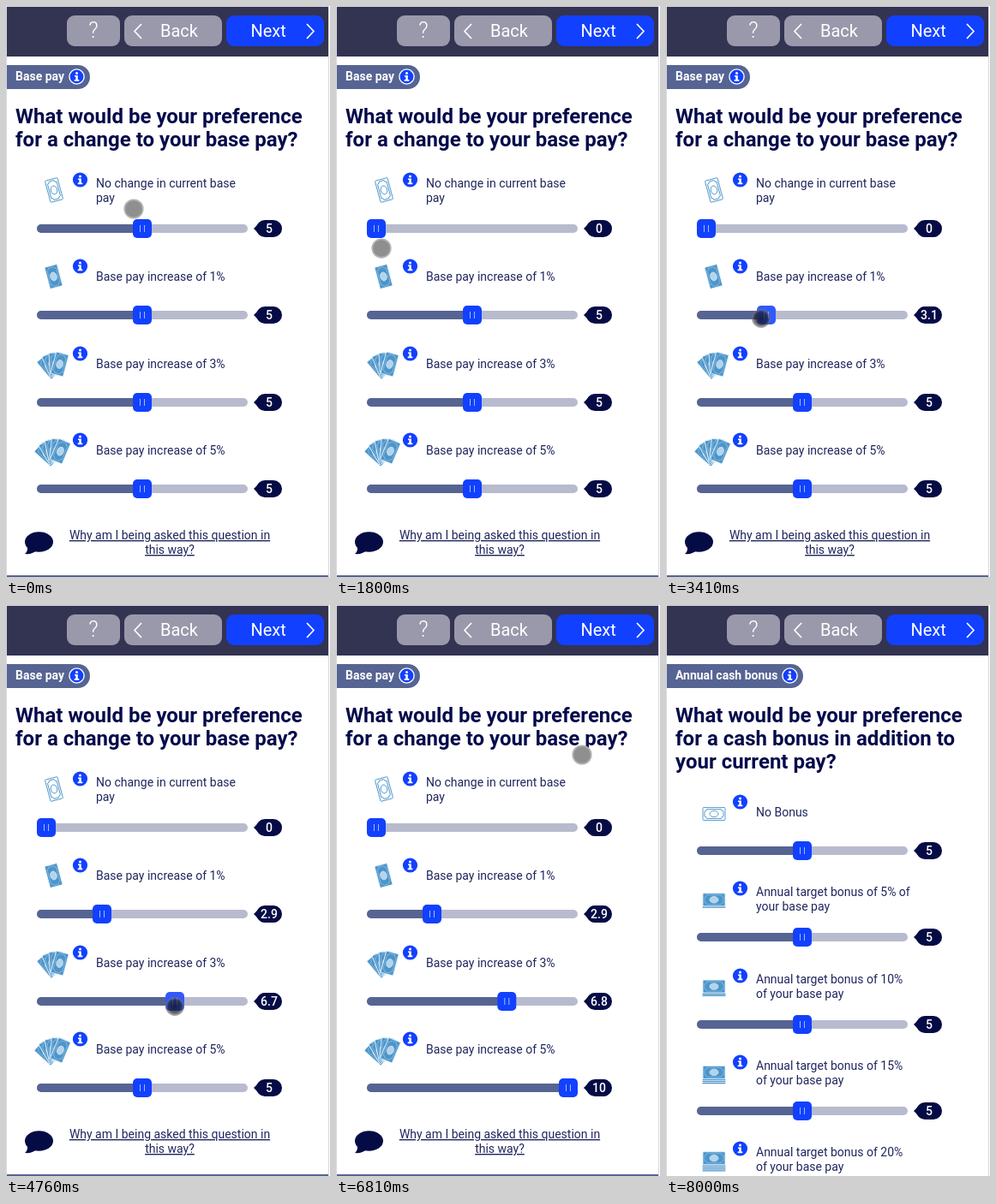
Write an HTML page that moves like this. It is 378 px wide and 667 px high and loops after 8680 ms.

```html
<!DOCTYPE html>
<html lang="en">
<head>
<meta charset="utf-8">
<title>Pay preferences</title>
<style>
  html, body { margin: 0; width: 100%; height: 100%; overflow: hidden; background: #fff; }
  svg { display: block; width: 378px; height: 667px; font-family: Roboto, "Open Sans", sans-serif; }
  .title { font-size: 24px; font-weight: 700; fill: #050b4b; }
  .label, .link { font-size: 14px; fill: #20265e; }
  .link { text-decoration: underline; text-anchor: middle; }
  .tag { font-size: 14px; font-weight: 700; fill: #fff; }
  .value { font-size: 14px; font-weight: 500; fill: #fff; text-anchor: middle; }
  .button { font-size: 20px; fill: #fff; }
  .chevron { fill: none; stroke: #fff; stroke-width: 1.7; }
</style>
</head>
<body>
<svg id="stage" viewBox="0 0 378 667"></svg>
<script>
const BLUE = '#1240ff', NAVY = '#050b45', SLATE = '#566493', NOTE = '#4c95ca';
const LOOP = 8680, MIN_X = 47, UNIT = 22.4;

// Bursts of movement: start, end, steps
const bursts = [
  [60, 360, 4], [630, 1440, 14], [1500, 1500, 1], [1690, 2390, 12],
  [3010, 3410, 8], [3590, 3650, 2], [3830, 4640, 15], [4700, 4760, 2],
  [5000, 5040, 2], [5280, 6090, 15], [6150, 6390, 5], [6630, 7270, 11],
  [7700, 8000, 6]
];

// Pointer path: time, x, y
const path = [
  [0, 149, 237], [360, 158, 263], [570, 158, 263], [1000, 90, 263],
  [1440, 28, 264], [1500, 18, 264], [1627, 18, 264], [1817, 53, 283],
  [2390, 153, 358], [2950, 153, 360], [3410, 111, 365], [3530, 111, 365],
  [3650, 106, 365], [3770, 106, 365], [4160, 148, 485], [4340, 159, 474],
  [4460, 159, 471], [4640, 187, 470], [4760, 197, 469], [4960, 197, 469],
  [5040, 199.3, 469], [5220, 199.3, 469], [5680, 156, 588], [5900, 163, 572],
  [6032, 183, 569], [6090, 214, 569], [6390, 307, 571], [6570, 307, 571],
  [6822, 287, 175], [7270, 309, 33], [LOOP, 309, 33]
];

// One drag per slider: start, release, handle offset from the pointer
const drags = [[600, 1690, 1], [2960, 3830, 6], [4400, 5280, 0], [5900, 6630, -4]];

const clamp = (v, lo, hi) => Math.min(hi, Math.max(lo, v));
const text = (cls, x, y, s) => `<text class="${cls}" x="${x}" y="${y}">${s}</text>`;
const lines = (cls, x, y, gap, list) =>
  list.map((s, i) => text(cls, x, y + i * gap, s)).join('');
const box = (x, y, w, h, r, fill, more = '') =>
  `<rect x="${x}" y="${y}" width="${w}" height="${h}" rx="${r}" fill="${fill}" ${more}/>`;

function info(x, y, ring) {
  return `<g transform="translate(${x} ${y})">
    <circle r="8.6" fill="${BLUE}" ${ring ? 'stroke="#fff" stroke-width="1.4"' : ''}/>
    <circle cy="-4" r="1.5" fill="#fff"/>
    <path d="M-2.5-1.6H1.3V3.6H2.8V5.2H-2.8V3.6H-1.2V0H-2.5Z" fill="#fff"/></g>`;
}

function note(filled, transform) {
  const face = filled ? NOTE : '#fff', line = filled ? '#c4def1' : NOTE;
  return `<g transform="${transform}" stroke="${line}" stroke-width=".9">
    ${box(-7.5, -13, 15, 26, 1, face, filled ? 'stroke="#e4f0f9"' : '')}
    <path d="M-3-11H3A2.5 2.5 0 0 0 5.5-8.5V8.5A2.5 2.5 0 0 0 3 11H-3A2.5 2.5 0 0 0-5.5 8.5V-8.5A2.5 2.5 0 0 0-3-11Z"
      fill="none" stroke-opacity="${filled ? .45 : 1}"/>
    <ellipse rx="3.7" ry="5" fill="${filled ? '#b3d4ec' : '#fff'}"/></g>`;
}

const fan = (x, y, angles) =>
  angles.map(a => note(true, `translate(${x} ${y}) rotate(${a}) translate(0 -14)`)).join('');

function stack(y, n) {
  let out = '';
  for (let i = n; i > 0; i--) out += box(42.5, y + 6 + i * 2, 27, 1.4, .6, NOTE);
  return out + note(true, `translate(56 ${y}) rotate(90)`);
}

function slider(y, id) {
  return `${box(36, y - 5, 246, 10, 5, '#b8bbce')}
    ${box(36, y - 5, 123, 10, 5, SLATE, `id="fill${id}"`)}
    <g id="knob${id}" transform="translate(159 ${y})">
      ${box(-11, -11, 22, 22, 5, BLUE)}
      <path d="M-2.5-4V4M2.5-4V4" stroke="#9fc0ee"/></g>
    <path d="M289 ${y}L295 ${y - 6}V${y + 6}Z" fill="${NAVY}"/>
    ${box(292, y - 10, 30, 20, 10, NAVY)}
    <text class="value" id="value${id}" x="307" y="${y + 4.5}">5</text>`;
}

const tag = (w, s) =>
  `<path d="M1 69H${w - 13}a14 14 0 0 1 0 28H1Z" fill="${SLATE}"/>` +
  text('tag', 11, 87, s) + info(w - 14.5, 82.5, true);

const rowY = [260, 361, 463, 564];
const names = [['No change in current base', 'pay'],
  ...[1, 3, 5].map(n => [`Base pay increase of ${n}%`])];
const bonus = [['No Bonus'], ['Annual target bonus of 5% of', 'your base pay'],
  ...[10, 15, 20].map(n => [`Annual target bonus of ${n}%`, 'of your base pay'])];

const firstPage = tag(97, 'Base pay') +
  lines('title', 11, 137, 27, ['What would be your preference', 'for a change to your base pay?']) +
  rowY.map((y, i) => info(86.5, y - 57) +
    lines('label', 105, y - (i ? 40 : 48), 17, names[i]) + slider(y, i)).join('') +
  note(false, 'translate(56 215) rotate(-15)') +
  note(true, 'translate(55.5 316) rotate(-15)') +
  fan(59, 432, [-40, -22, -3, 15]) +
  fan(58, 533, [-48, -30, -12, 6, 23]) +
  `<ellipse cx="38.5" cy="626" rx="16.5" ry="11.8" fill="${NAVY}"/>
   <path d="M24 629Q27 636 22 640Q30 641 36 636Z" fill="${NAVY}"/>` +
  lines('link', 191, 623, 17, ['Why am I being asked this question in', 'this way?']) +
  box(1, 665, 375, 2, 0, SLATE);

const secondPage = tag(159, 'Annual cash bonus') +
  lines('title', 11, 137, 27,
    ['What would be your preference', 'for a cash bonus in addition to', 'your current pay?']) +
  bonus.map((s, i) => {
    const y = (rowY[i] || 665) + 27;
    return info(86.5, y - 57) + lines('label', 105, y - (i ? 48 : 40), 17, s) +
      (i < 4 ? slider(y, 'b' + i) : '') +
      (i ? stack(y - 43 - i * .7, i) : note(false, 'translate(56 244) rotate(90)'));
  }).join('');

const header = box(1, 1, 375, 58, 0, '#333352') +
  box(71, 11, 62, 36, 9, '#9a98ab') + box(138, 11, 114, 36, 9, '#9a98ab') +
  box(257, 11, 114, 36, 9, BLUE, 'id="next"') +
  '<text class="button" x="102" y="37" text-anchor="middle" style="font-size:25px;font-weight:300">?</text>' +
  text('button', 180, 36, 'Back') + text('button', 285.5, 36, 'Next') +
  '<path class="chevron" d="M158 21L150 29.500L158 38M351 21L359 29.500L351 38"/>';

document.getElementById('stage').innerHTML = `
  <defs><radialGradient id="press">
    <stop offset="0" stop-color="#10121f" stop-opacity=".8"/>
    <stop offset=".7" stop-color="#1c1e2c" stop-opacity=".7"/>
    <stop offset="1" stop-color="#777" stop-opacity=".55"/>
  </radialGradient></defs>
  <rect width="378" height="667" fill="#fff"/>
  <g id="first">${firstPage}</g><g id="second">${secondPage}</g>${header}
  <path d="M.5 667V.5H376.500V667" fill="none" stroke="#d9d9dd"/>
  <circle id="pointer" r="10.700"/>`;

const el = id => document.getElementById(id);

// Holds the time at the latest step of the current burst
function snap(t) {
  let held = 0;
  for (const [start, end, n] of bursts) {
    if (t < start) break;
    if (n < 2) { held = start; continue; }
    const k = Math.min(n - 1, Math.floor((t - start) / (end - start) * (n - 1) + .3));
    held = start + k * (end - start) / (n - 1);
  }
  return held;
}

function pointerAt(t) {
  const i = path.findIndex(p => p[0] > t);
  const [t0, x0, y0] = path[i - 1], [t1, x1, y1] = path[i];
  const p = (t - t0) / (t1 - t0);
  return [x0 + (x1 - x0) * p, y0 + (y1 - y0) * p];
}

function draw(t) {
  const now = snap(t), [x, y] = pointerAt(now);
  let held = false;

  drags.forEach(([from, to, offset], i) => {
    const active = now >= from && now < to;
    held = held || active;
    let pos = 159;
    if (now >= from) {
      const px = active ? x : pointerAt(to - 60)[0];
      pos = clamp(px + offset, MIN_X, MIN_X + 10 * UNIT);
    }
    el('fill' + i).setAttribute('width', pos - 36);
    const knob = el('knob' + i);
    knob.setAttribute('transform', `translate(${pos.toFixed(1)} ${rowY[i]})`);
    knob.firstElementChild.setAttribute('fill', active ? '#3159fb' : BLUE);
    el('value' + i).textContent = +((pos - MIN_X) / UNIT).toFixed(1);
  });

  const fade = clamp((now - 7640) / 360, 0, 1);
  el('first').setAttribute('opacity', 1 - fade);
  el('second').setAttribute('opacity', fade);
  el('next').setAttribute('fill', fade > 0 && fade < 1 ? '#3159fb' : BLUE);

  const dot = el('pointer');
  dot.setAttribute('cx', x);
  dot.setAttribute('cy', y);
  dot.setAttribute('opacity', 1 - fade);
  dot.setAttribute('fill', held ? 'url(#press)' : '#8f8f8f');
  dot.setAttribute('stroke', held ? 'rgba(120,120,120,.35)' : '#b3b3b3');
  dot.setAttribute('stroke-width', held ? 1 : 1.8);
}

const begin = performance.now();
function tick() {
  draw((performance.now() - begin) % LOOP);
  requestAnimationFrame(tick);
}
tick();
</script>
</body>
</html>
```
